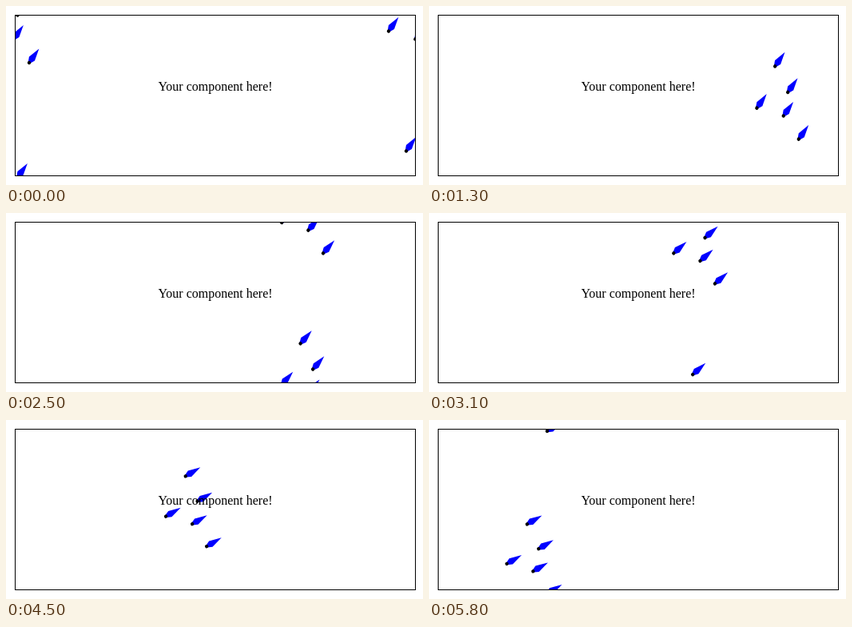
Animation of 522x224 px, one loop 5.9 s. Source, as an HTML page with a canvas:

```html
<!DOCTYPE html>
<html lang="en">
<head>
<meta charset="utf-8">
<title>Flock</title>
<style>
  html, body { margin: 0; width: 100%; height: 100%; overflow: hidden; background: #fff; }
  canvas { position: absolute; left: 11px; top: 11px; border: 1px solid #000; }
  p {
    position: absolute; left: 0; top: 92px; width: 524px; margin: 0;
    font: 16px/18px "Liberation Serif", "Times New Roman", serif;
    color: #000; text-align: center;
  }
</style>
</head>
<body>
<canvas width="500" height="200"></canvas>
<p>Your component here!</p>
<script>
const ctx = document.querySelector("canvas").getContext("2d");
const STEP = 100, STEPS = 59;
const WRAP_X = 503, WRAP_Y = 203;
const SPEED = 9.1;
const START = { x: 489, y: -33.5 };
const CLOSING = 0.065;
const followers = [[0, 0], [16.5, 33], [-22, 53], [11.5, 63], [31, 92.5]];

const mod = (a, n) => ((a % n) + n) % n;

// The flock flies straight, turns evenly, then flies straight again.
function heading(s) {
  const turned = Math.min(1, Math.max(0, (s - 20) / 20));
  return (55 - 24.5 * turned) * Math.PI / 180;
}

function leader(s) {
  let { x, y } = START;
  for (let i = 0; i < s; i++) {
    const a = heading(i + 0.5);
    x -= SPEED * Math.cos(a);
    y += SPEED * Math.sin(a);
  }
  return { x, y };
}

function bird(x, y, angle) {
  ctx.save();
  ctx.translate(x, y);
  ctx.rotate(-angle);
  ctx.fillStyle = "#00f";
  ctx.beginPath();
  ctx.moveTo(0, -1.5);
  ctx.lineTo(6, -4.3);
  ctx.lineTo(21.5, 0);
  ctx.lineTo(6, 4.3);
  ctx.lineTo(0, 1.5);
  ctx.fill();
  ctx.fillStyle = "#000";
  ctx.beginPath();
  ctx.arc(0, 0, 2.2, 0, Math.PI * 2);
  ctx.fill();
  ctx.restore();
}

function draw(s) {
  ctx.clearRect(0, 0, 500, 200);
  const lead = leader(s), angle = heading(s);
  for (const [ox, oy] of followers) {
    const shift = CLOSING * oy * s / STEPS;
    const x = mod(lead.x + ox - shift, WRAP_X);
    const y = mod(lead.y + oy - shift, WRAP_Y);
    for (const dx of [-WRAP_X, 0, WRAP_X])
      for (const dy of [-WRAP_Y, 0, WRAP_Y]) bird(x + dx, y + dy, angle);
  }
}

const start = performance.now();
function tick() {
  draw(Math.floor((performance.now() - start) / STEP) % STEPS);
  requestAnimationFrame(tick);
}
tick();
</script>
</body>
</html>
```
